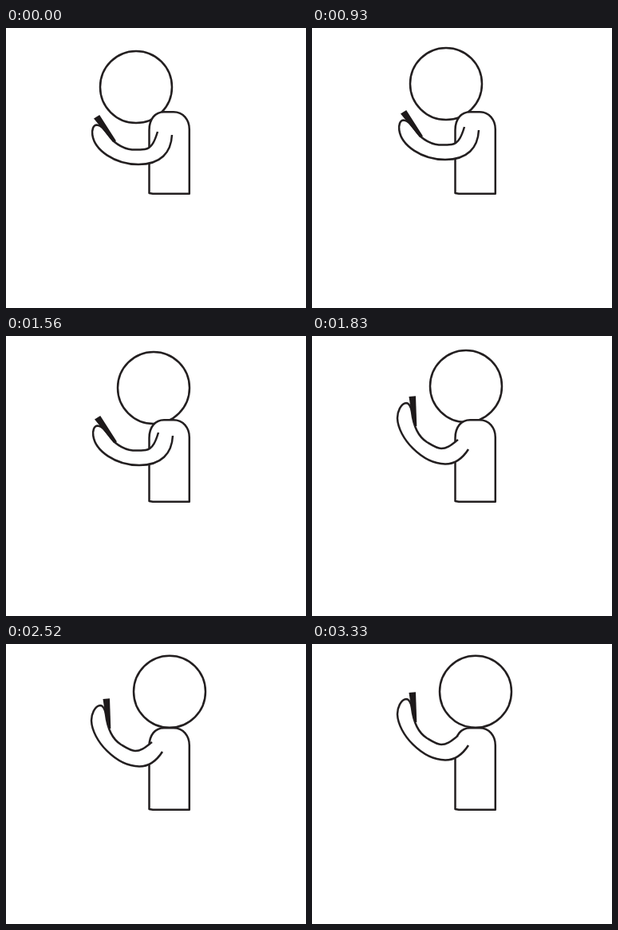
Animation, 376 px wide and 351 px high, one loop 3390 ms. Source, as an HTML page:

```html
<!DOCTYPE html>
<html lang="en">
<head>
<meta charset="utf-8">
<title>Raising the phone</title>
<style>
  html, body { margin: 0; width: 100%; height: 100%; overflow: hidden; background: #fff; }
  svg { display: block; width: 100vw; height: 100vh; }
  .line { fill: #fff; stroke: #231f20; stroke-width: 2.5; stroke-linejoin: round; }
  .phone { fill: #1d191a; }
</style>
</head>
<body>
<svg viewBox="0 0 376 351">
  <circle id="head" class="line" r="45"/>
  <path class="line" d="M179.5 207V128C179.5 114 187 105.2 198 105.2H210C222 105.2 229.8 115 229.8 127V207.8L184 207.8Z"/>
  <g id="low">
    <path class="line" d="M190 130C187 140 183 151 174 152C158 153.5 148 153 135 142C127 134 122 122 114 121.5C109 121.5 107.5 128 108.3 134C111 153 136 171 166 171C194 171 207 156 208 134"/>
    <path class="phone" d="M110 113.5L117.2 109L138 141.5L134 143L119 124.5Z"/>
  </g>
  <g id="high">
    <path class="line" d="M183 130C175 136 170 141 162 141C156 141 149 136 144 133C133 126 127 112 125 95C124 88 121 84 118 84C111 85 107 95 107 103C108 128 138 160 167 160.5C180 160.5 189 153 196 142"/>
    <path class="phone" d="M121.5 76L130 75.3L131.3 113L128.5 113L124 93Z"/>
  </g>
</svg>
<script>
const LOOP = 3390, TICK = 30, TURN = 930, SWITCH = 1650;
const [head, low, high] = ["head", "low", "high"].map(id => document.getElementById(id));
const { floor, min } = Math;

// Whole pixels travelled after t ms, one pixel every `every` ms
const steps = (t, every) => floor(t / every);
const move = (el, x, y) => el.setAttribute("transform", `translate(${x} ${y})`);

function draw(t) {
  if (t < TURN) {
    move(head, 163 + steps(t, 186), 74 - steps(t + 120, 240));
  } else {
    const s = t - TURN;
    move(head, 168 + min(37, steps(s, 36)), 70 - min(10.3, steps(s, 120)));
  }
  move(low, t < 800 ? 0 : 1, -steps(t + 150, 180));
  move(high, 0, -steps(t - 1755, 105));
  low.style.display = t < SWITCH ? "" : "none";
  high.style.display = t < SWITCH ? "none" : "";
}

const start = performance.now();
function frame() {
  const t = (performance.now() - start) % LOOP;
  draw(floor(t / TICK) * TICK);
  requestAnimationFrame(frame);
}
frame();
</script>
</body>
</html>
```
